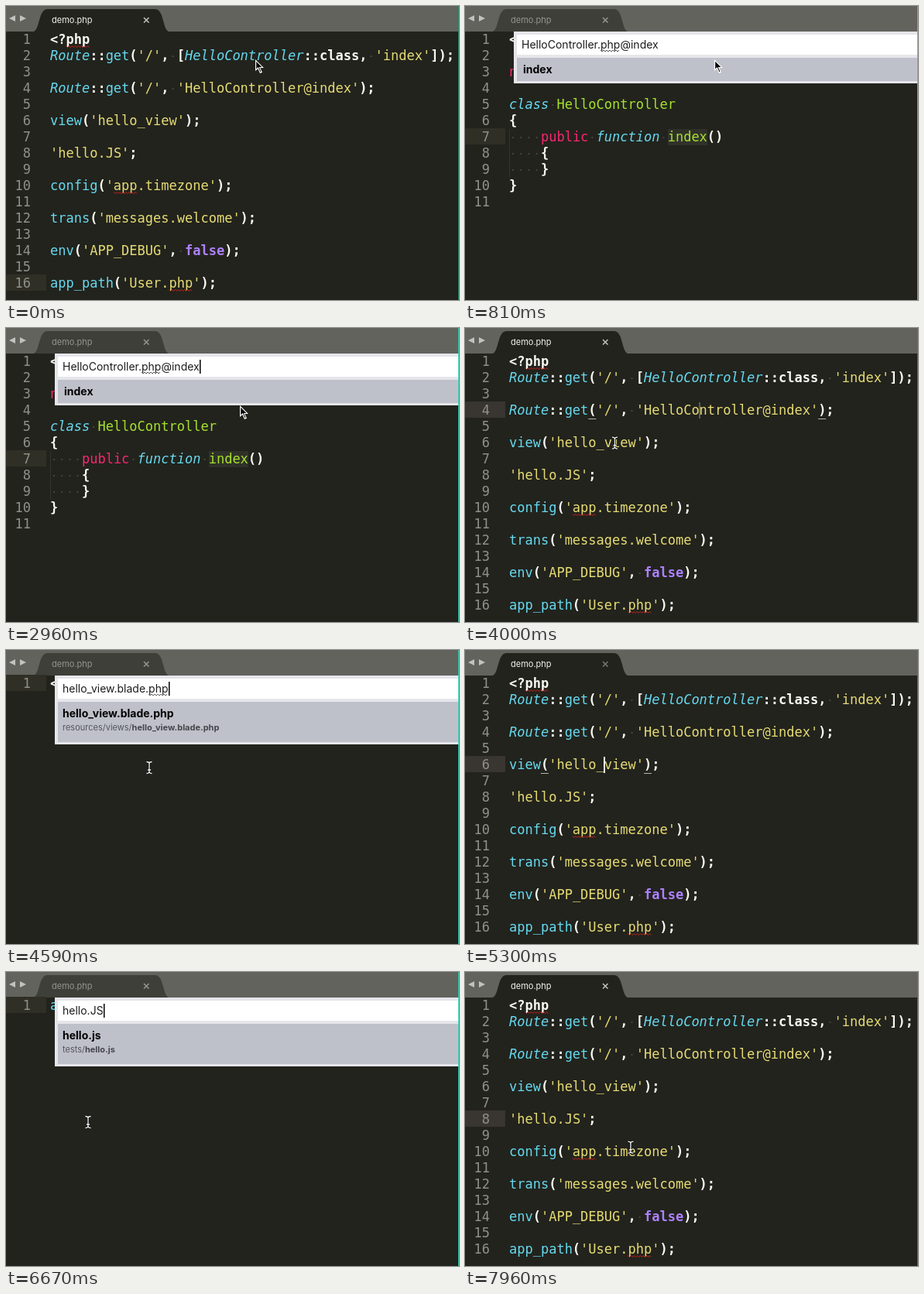
These frames come from a looping animation (585x380 px, 8000 ms). An HTML page with a canvas:

```html
<!DOCTYPE html>
<html lang="en">
<head>
<meta charset="utf-8">
<style>
html, body { margin: 0; width: 585px; height: 380px; overflow: hidden; background: #22231d; }
canvas { display: block; }
</style>
</head>
<body>
<canvas id="stage" width="585" height="380"></canvas>
<script>
const ctx = document.getElementById('stage').getContext('2d');
const LOOP = 8000, LEFT = 57, CHAR = 10.234, LINE = 21;
const MONO = '17px "DejaVu Sans Mono", monospace';
const SANS = 'Inter, sans-serif';

// The first letter of each token names its style.
const STYLES = {
  w: ['#f8f8f2', 'bold '], c: ['#66d9ef', ''], i: ['#66d9ef', 'italic '],
  s: ['#e6db74', ''], v: ['#ae81ff', 'bold '], p: ['#f92672', ''], g: ['#a6e22e', '']
};

const DEMO = [
  ['w<?php'],
  ['iRoute', 'w::', 'cget', 'w(', "s'/'", 'w, [', 'iHelloController', 'w::class, ', "s'index'", 'w]);'],
  [],
  ['iRoute', 'w::', 'cget', 'w(', "s'/'", 'w, ', "s'HelloController@index'", 'w);'],
  [],
  ['cview', 'w(', "s'hello_view'", 'w);'],
  [],
  ["s'hello.JS'", 'w;'],
  [],
  ['cconfig', 'w(', "s'app.timezone'", 'w);'],
  [],
  ['ctrans', 'w(', "s'messages.welcome'", 'w);'],
  [],
  ['cenv', 'w(', "s'APP_DEBUG'", 'w, ', 'vfalse', 'w);'],
  [],
  ['capp_path', 'w(', "s'User.php'", 'w);']
];
const CONTROLLER = [
  ['w<?php'], [], ['pnamespace'], [],
  ['iclass', 'w ', 'gHelloController'],
  ['w{'],
  ['w    ', 'ppublic', 'w ', 'ifunction', 'w ', 'gindex', 'w()'],
  ['w    {'], ['w    }'], ['w}'], []
];

const CONTROLLER_PANEL = { input: 'HelloController.php@index', title: 'index', titleX: 75, bottom: 100,
  lines: CONTROLLER, row: 7 };
const VIEW_PANEL = { input: 'hello_view.blade.php', title: 'hello_view.blade.php', titleX: 73, bottom: 122,
  path: 'resources/views/', lines: [['w<div>']], row: 1 };
const SCRIPT_PANEL = { input: 'hello.JS', title: 'hello.js', titleX: 73, bottom: 122,
  path: 'tests/', lines: [['calert']], row: 1 };

// Caret row, column and the columns of the matching brackets.
const CARETS = {
  path: { row: 16, col: 11, pair: [8, 19] },
  route: { row: 4, col: 24, pair: [10, 39] },
  view: { row: 6, col: 12, pair: [4, 17] },
  script: { row: 8, col: 5, pair: [] }
};

const SCENES = [
  { at: 0, caret: CARETS.path, blurred: true },
  { at: 40, panel: CONTROLLER_PANEL },
  { at: 1710, caret: CARETS.path },
  { at: 2520, caret: CARETS.route, blurred: true },
  { at: 2560, panel: CONTROLLER_PANEL },
  { at: 3450, caret: CARETS.route },
  { at: 4340, caret: CARETS.view, blurred: true },
  { at: 4380, panel: VIEW_PANEL },
  { at: 5290, caret: CARETS.view },
  { at: 6220, caret: CARETS.script, blurred: true },
  { at: 6260, panel: SCRIPT_PANEL },
  { at: 7360, caret: CARETS.script }
];

// The pointer hides on a key press and shows again when it moves.
const MOVES = [
  { show: 0, from: [322, 69], to: [322, 69], end: 1, hide: 1710 },
  { show: 1950, from: [322, 72], to: [302, 100], end: 2330, hide: 3450 },
  { show: 3600, from: [302, 104], to: [185, 152], end: 4080, hide: 5290 },
  { show: 5480, from: [185, 152], to: [106, 194], end: 6050, hide: 7360 },
  { show: 7660, from: [108, 193], to: [215, 227], end: 7980, hide: LOOP }
];

const clamp = x => Math.max(0, Math.min(1, x));
const ease = x => { x = clamp(x); return x * x * (3 - 2 * x); };
const baseline = row => 28 + LINE * row;
const column = col => LEFT + CHAR * col;

function rect(color, x, y, w, h) {
  ctx.fillStyle = color;
  ctx.fillRect(x, y, w, h);
}

function text(str, x, y, color, font) {
  ctx.font = font;
  ctx.fillStyle = color;
  ctx.fillText(str, x, y);
  return x + ctx.measureText(str).width;
}

function path(color, points) {
  ctx.beginPath();
  points.forEach(([x, y]) => ctx.lineTo(x, y));
  ctx.closePath();
  ctx.fillStyle = color;
  ctx.fill();
}

function squiggle(x, y, width, color) {
  ctx.beginPath();
  for (let d = 0; d <= width; d += 2) ctx.lineTo(x + d, y + (d % 4 ? 1 : -1));
  ctx.strokeStyle = color;
  ctx.lineWidth = 1;
  ctx.stroke();
}

function blink(ms) {
  const p = (ms % 1000) / 1000;
  return p < 0.85 ? 1 - ease((p - 0.4) / 0.23) : ease((p - 0.85) / 0.15);
}

function drawCode(lines, row, focused) {
  rect(focused ? '#393530' : '#2f2f26', 0, baseline(row) - 17, 52, LINE);
  lines.forEach((tokens, i) => {
    const y = baseline(i + 1);
    ctx.textAlign = 'right';
    text(String(i + 1), 32, y, '#8f908a', MONO);
    ctx.textAlign = 'left';
    let col = 0;
    for (const token of tokens) {
      const [color, weight] = STYLES[token[0]], str = token.slice(1);
      text(str, column(col), y, color, weight + MONO);
      [...str].forEach((ch, k) => {
        if (ch === ' ') rect('#44453d', column(col + k) + 4, y - 6, 2, 2);
      });
      col += str.length;
    }
  });
}

function drawTabBar(active, closeLight) {
  rect('#62635d', 0, 0, 585, 33);
  const shade = Math.round(62 - 28 * active);
  ctx.beginPath();
  ctx.moveTo(36, 33);
  ctx.bezierCurveTo(44, 29, 42, 5, 53, 4);
  ctx.lineTo(193, 4);
  ctx.bezierCurveTo(204, 5, 202, 29, 210, 33);
  ctx.fillStyle = `rgb(${shade},${shade + 1},${shade - 5})`;
  ctx.fill();
  path('#c2c2be', [[4, 16], [12, 12], [12, 20]]);
  path('#c2c2be', [[26, 16], [18, 12], [18, 20]]);
  text('demo.php', 59, 22, active > 0.5 ? '#f4f4f0' : '#94958e', '11px ' + SANS);
  const gray = Math.round(120 + 75 * closeLight);
  ctx.strokeStyle = `rgb(${gray},${gray},${gray - 4})`;
  ctx.lineWidth = 1.5;
  ctx.beginPath();
  ctx.moveTo(178, 15); ctx.lineTo(184.5, 21.5);
  ctx.moveTo(184.5, 15); ctx.lineTo(178, 21.5);
  ctx.stroke();
}

function drawDemo(scene, age) {
  const { row, col, pair } = scene.caret, y = baseline(row);
  drawCode(DEMO, row, !scene.blurred);
  for (const [r, c] of [[1, 2], [10, 8], [16, 15]])
    squiggle(column(c), baseline(r) + 3.5, 30, '#d0201c');
  if (scene.blurred) return;
  pair.forEach(c => rect('#b5b5ae', column(c), y + 5, 10, 1));
  ctx.globalAlpha = blink(age);
  rect('#f8f8f0', Math.round(column(col)) - 1, y - 16, 2, LINE);
  ctx.globalAlpha = 1;
}

function drawPanel(panel, age) {
  if (panel.lines === CONTROLLER) {
    rect('#303129', 262, 159, 51, 21);
    rect('#33342c', 57, 159, 1, 62);
  }
  drawCode(panel.lines, panel.row, false);
  rect('#e5e5ea', 63, 33, 522, panel.bottom - 33);
  rect('#ffffff', 67, 37, 518, 26);
  rect('#bfc1ca', 67, 67, 518, panel.bottom - 70);
  const end = text(panel.input, 73, 55, '#1c1c1c', '14px ' + SANS);
  const dot = panel.input.indexOf('.php');
  if (dot > 0) {
    const x = 73 + ctx.measureText(panel.input.slice(0, dot + 1)).width;
    squiggle(x, 58, ctx.measureText('php').width, '#555');
  }
  ctx.globalAlpha = blink(age);
  rect('#000', Math.round(end), 41, 1.5, 18);
  ctx.globalAlpha = 1;
  text(panel.title, panel.titleX, 87, '#000', 'bold 14px ' + SANS);
  if (panel.path) {
    const x = text(panel.path, 73, 104, '#55565c', '11px ' + SANS);
    text(panel.title, x, 104, '#45464c', 'bold 11px ' + SANS);
  }
}

function drawArrow(x, y) {
  ctx.save();
  ctx.translate(x, y);
  path('#fff', [[0, 0], [0, 15], [3.3, 12], [6, 18], [9, 16.7], [6.3, 11], [11, 11]]);
  path('#000', [[1.2, 2.7], [1.2, 12.3], [3.7, 9.9], [6.5, 16.2], [7.4, 15.8], [4.7, 9.9], [8.4, 9.9]]);
  ctx.restore();
}

function drawBeam(x, y) {
  ctx.beginPath();
  ctx.moveTo(x - 3.5, y - 7.5);
  ctx.quadraticCurveTo(x, y - 7.5, x, y - 5);
  ctx.quadraticCurveTo(x, y - 7.5, x + 3.5, y - 7.5);
  ctx.moveTo(x, y - 5);
  ctx.lineTo(x, y + 5);
  ctx.moveTo(x - 3.5, y + 7.5);
  ctx.quadraticCurveTo(x, y + 7.5, x, y + 5);
  ctx.quadraticCurveTo(x, y + 7.5, x + 3.5, y + 7.5);
  ctx.moveTo(x - 2, y + 3);
  ctx.lineTo(x + 2, y + 3);
  for (const [color, width] of [['#111', 3], ['#f4f4f4', 1.3]]) {
    ctx.strokeStyle = color;
    ctx.lineWidth = width;
    ctx.stroke();
  }
}

function drawPointer(t, scene) {
  const move = MOVES.find(m => t >= m.show && t < m.hide);
  if (!move) return;
  const k = ease((t - move.show) / (move.end - move.show));
  const [x, y] = move.from.map((v, i) => v + (move.to[i] - v) * k);
  const overPanel = scene.panel && y <= scene.panel.bottom;
  if (overPanel || t < 40) drawArrow(x, y);
  else drawBeam(x, y);
}

function draw(t) {
  const scene = SCENES.filter(s => s.at <= t).pop(), age = t - scene.at;
  rect('#22231d', 0, 0, 585, 380);
  if (scene.panel) {
    drawTabBar(1 - clamp(age / 160), 0.4);
    drawPanel(scene.panel, age);
  } else {
    drawTabBar(1, scene.blurred ? 1 : ease((age - 100) / 250));
    drawDemo(scene, age);
  }
  rect(scene.panel ? '#35c9ac' : '#258a70', 584, 0, 1, 380);
  drawPointer(t, scene);
}

function tick() {
  draw(performance.now() % LOOP);
  requestAnimationFrame(tick);
}
tick();
</script>
</body>
</html>
```
